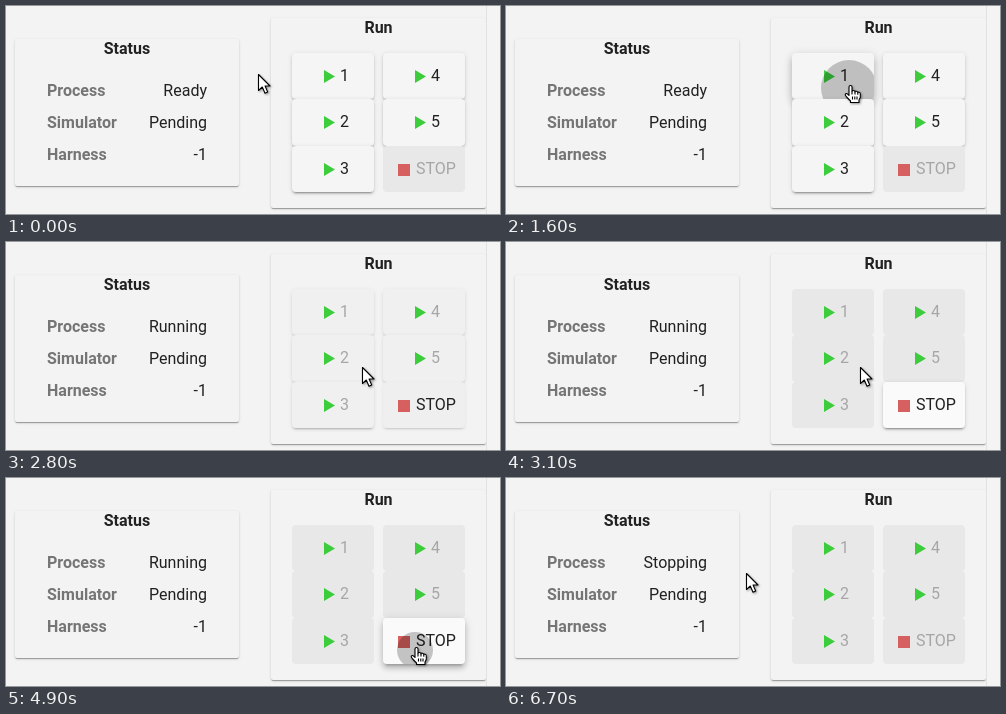
These frames come from a looping animation (494 px wide and 208 px high, 8000 ms). An HTML page:

```html
<!DOCTYPE html>
<html lang="en">
<head>
<meta charset="utf-8">
<title>Status and run panel</title>
<style>
  html, body { margin: 0; width: 100%; height: 100%; overflow: hidden; background: #f3f3f3; }
  body { font: 16px/20px Roboto, sans-serif; color: #212121; }
  div, span, b, svg { position: absolute; white-space: nowrap; }
  .card {
    border-radius: 2px; background: #f3f3f3;
    box-shadow: 0 2px 1px -1px rgba(0,0,0,.2), 0 1px 1px rgba(0,0,0,.14), 0 1px 3px rgba(0,0,0,.14);
  }
  .title { left: 0; right: 0; text-align: center; }
  .label { left: 32px; color: #757575; }
  .value { right: 32px; }
  .edge { left: 480px; top: 0; width: 14px; height: 208px; background: #f4f4f4; border-left: 1px solid #e2e2e2; }
  .button { width: 82px; height: 46.4px; border-radius: 4px; overflow: hidden; }
  .button span { top: 13px; }
  .button svg { top: 17px; width: 14px; height: 14px; }
  .ripple { border-radius: 50%; background: #000; }
  .cursor { overflow: visible; width: 18px; height: 21px; filter: drop-shadow(1px 1px 1px rgba(0,0,0,.4)); }
  .cursor path { fill: #fff; stroke: #000; stroke-width: 1.1; stroke-linejoin: round; }
</style>
</head>
<body>
<div class="card" style="left:9px;top:33px;width:224px;height:147px">
  <b class="title">Status</b>
  <b class="label" style="top:42px">Process</b><span class="value" style="top:42px" id="process">Ready</span>
  <b class="label" style="top:74px">Simulator</b><span class="value" style="top:74px">Pending</span>
  <b class="label" style="top:106px">Harness</b><span class="value" style="top:106px">-1</span>
</div>
<div class="card" style="left:265px;top:12px;width:215px;height:190px">
  <b class="title">Run</b>
</div>
<div class="edge"></div>
<svg class="cursor" id="arrow"><path d="M.5 .5V16.5L4.3 13 7 19.3 9.7 18 7.1 12H12Z"/></svg>
<svg class="cursor" id="hand">
  <path d="M5 10V2a1.5 1.5 0 0 1 3 0V6.5Q8 5.4 9.4 5.5T11 7Q11 6 12.3 6.2T13.8 7.7Q14 7 15.2 7.2T16.3 9V12.5L15 15V17.5H6.5V16L2.6 12Q.5 9.5 1.7 8.7T5 10.5Z"/>
  <path d="M8 6.5V9.5M11 7V9.5M13.8 7.7V9.8M8.5 11.5V14.5M10.8 11.5V14.5M13 11.5V14.5"/>
</svg>
<script>
const LOOP = 8000, STEP = 100, RUN_AT = 2700, STOP_AT = 5900;
const $ = id => document.getElementById(id);
const clamp = v => Math.max(0, Math.min(1, v));
const mix = (a, b, k) => a + (b - a) * k;

// Pointer hot spot: time, x, y
const path = [
  [0, 252, 68], [100, 252, 68], [200, 300, 74], [300, 347, 82], [400, 347, 82], [700, 343, 80],
  [1700, 343, 80], [1900, 352, 108], [2100, 358, 124], [2700, 358, 124], [2900, 354, 125],
  [4000, 354, 125], [4100, 366, 136], [4200, 386, 152], [4300, 402, 167], [4400, 409, 170],
  [5300, 409, 170], [5600, 391, 155], [5800, 375, 143], [6200, 306, 113], [6600, 248, 97],
  [6700, 240, 95], [LOOP, 240, 95]
];
// Presses: start, button, x, y
const presses = [[870, 0, 343, 82], [1525, 0, 343, 82], [1960, 1, 358, 124], [4850, 5, 409, 172]];

const add = (parent, name, html = '') => {
  const el = document.createElement('div');
  el.className = name;
  el.innerHTML = html;
  parent.append(el);
  return el;
};

const buttons = ['1', '2', '3', '4', '5', 'STOP'].map((text, i) => {
  const x = i < 3 ? 286 : 377, y = 47 + i % 3 * 46.4, stop = i === 5;
  const icon = stop ? '<path fill="#d65f5f" d="M0 1H12V13H0Z"/>' : '<path fill="#3ccc3c" d="M0 0L11 6.5 0 13Z"/>';
  const el = add(document.body, 'button',
    `<svg style="left:${stop ? 15 : 32}px">${icon}</svg><span style="left:${stop ? 33 : 48}px">${text}</span>`);
  el.style.left = x + 'px';
  el.style.top = y + 'px';
  return { el, x, y, stop };
});
document.body.append($('arrow'), $('hand'));

const ripples = presses.map(([start, index, px, py]) => {
  const b = buttons[index], x = px - b.x, y = py - b.y;
  const reach = Math.hypot(Math.max(x, 82 - x), Math.max(y, 46.4 - y));
  return { start, b, x, y, reach, el: add(b.el, 'ripple') };
});

function pointer(t) {
  const i = path.findIndex(p => p[0] > t), [t0, x0, y0] = path[i - 1], [t1, x1, y1] = path[i];
  const k = (t - t0) / (t1 - t0);
  return [mix(x0, x1, k), mix(y0, y1, k)];
}

function shadow(on, lift) {
  const layer = (y, blur, spread, alpha) => `0 ${y}px ${blur}px ${spread}px rgba(0,0,0,${alpha * on})`;
  return [
    layer(mix(3, 5, lift), mix(1, 5, lift), mix(-2, -3, lift), .2),
    layer(mix(2, 8, lift), mix(2, 10, lift), lift, .14),
    layer(mix(1, 3, lift), mix(5, 14, lift), 2 * lift, .12)
  ].join();
}

function draw(t) {
  $('process').textContent = t < RUN_AT ? 'Ready' : t < STOP_AT ? 'Running' : 'Stopping';
  const started = clamp((t - RUN_AT + 50) / 400), stopped = clamp((t - STOP_AT + 50) / 400);

  for (const r of ripples) {
    const age = t - r.start, radius = r.reach * (1 - (1 - clamp(age / 450)) ** 3);
    Object.assign(r.el.style, {
      left: r.x - radius + 'px', top: r.y - radius + 'px',
      width: 2 * radius + 'px', height: 2 * radius + 'px',
      opacity: .22 * (1 - clamp((age - 250) / 300))
    });
  }

  const [x, y] = pointer(t);
  let over = false;
  for (const b of buttons) {
    const enabled = b.stop ? t >= RUN_AT && t < STOP_AT : t < RUN_AT;
    const on = b.stop ? started - stopped : 1 - started;
    const lift = Math.max(0, ...ripples.filter(r => r.b === b).map(r => Math.sin(Math.PI * clamp((t - r.start) / 400))));
    const grey = mix(232, b.stop ? 250 : 245, on);
    b.el.style.background = `rgb(${grey},${grey},${grey})`;
    b.el.style.color = enabled ? '#212121' : '#a6a6a6';
    b.el.style.boxShadow = shadow(on, lift);
    over ||= enabled && x >= b.x && x < b.x + 82 && y >= b.y && y < b.y + 46.4;
  }

  $('arrow').style.display = over ? 'none' : '';
  $('hand').style.display = over ? '' : 'none';
  $('arrow').style.transform = `translate(${Math.round(x)}px,${Math.round(y)}px)`;
  $('hand').style.transform = `translate(${Math.round(x) - 5}px,${Math.round(y) - 1}px)`;
}

for (const id of ['arrow', 'hand']) Object.assign($(id).style, { left: 0, top: 0 });
const begin = performance.now();
(function tick() {
  const t = (performance.now() - begin) % LOOP;
  draw(Math.floor(t / STEP) * STEP);
  requestAnimationFrame(tick);
})();
</script>
</body>
</html>
```
